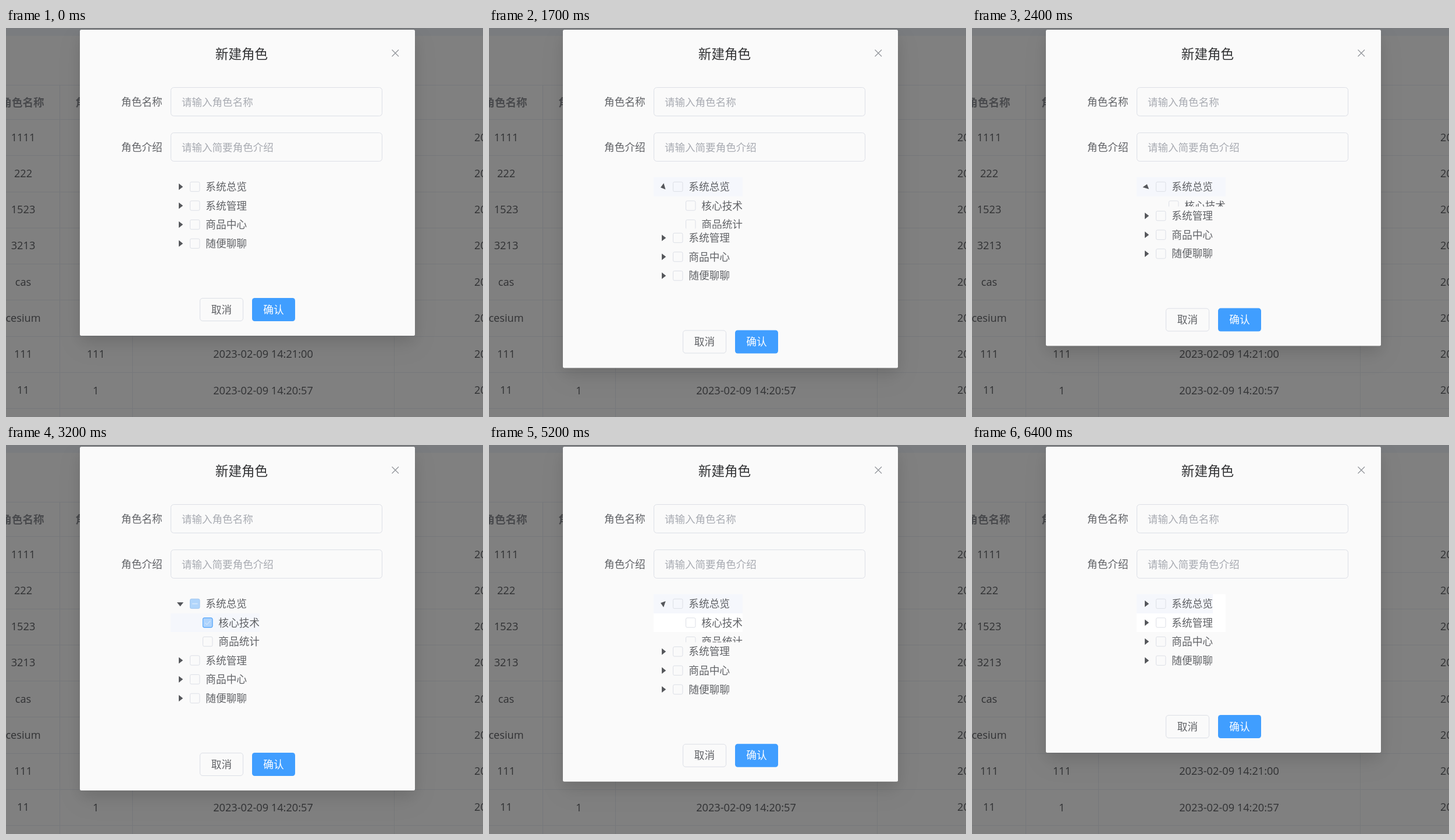
An HTML page that plays this animation: 820 px wide and 670 px high, repeating every 6800 ms.

```html
<!DOCTYPE html>
<html lang="zh">
<head>
<meta charset="utf-8">
<style>
html, body { margin: 0; width: 100%; height: 100%; overflow: hidden; background: #808080; }
svg { display: block; width: 820px; height: 670px; }
text { font-family: "Open Sans", "Noto Sans CJK SC", "Noto Sans CJK", sans-serif; font-size: 17.7px; fill: #606266; }
.cell { font-size: 18.2px; fill: #303133; text-anchor: middle; }
.head { font-size: 18.6px; font-weight: 700; fill: #48494c; text-anchor: middle; }
.left { text-anchor: start; }
.title { font-size: 22.6px; fill: #303133; text-anchor: middle; }
.hint { font-size: 17.55px; fill: #a8abb2; }
.mid { text-anchor: middle; }
.box { fill: none; stroke: #dcdfe6; }
#panel { filter: drop-shadow(0 10px 12px rgba(0,0,0,.09)) drop-shadow(0 15px 20px rgba(0,0,0,.06)); }
</style>
</head>
<body>
<svg id="stage" viewBox="0 0 820 670">
  <defs><clipPath id="fold"><rect id="foldBox" x="283" y="290" width="200" height="0"/></clipPath></defs>
  <rect width="820" height="670" fill="#808080"/>
  <rect width="820" height="13.5" fill="#7a7c7f"/>
  <g id="table"></g>
  <rect id="panel" x="127" y="3" width="576" height="527" rx="2.5" fill="#fafafa"/>
  <g id="form"></g>
  <g id="hover">
    <rect id="rowA" x="283" y="257" width="153" height="33" fill="#f5f7fc"/>
    <rect id="rowTail" x="414" y="257" width="22" height="33" fill="#fff"/>
    <rect id="rowB" x="283" y="290" width="153" height="32"/>
  </g>
  <g id="root"></g>
  <g id="kids" clip-path="url(#fold)"></g>
  <g id="rest"></g>
  <g id="buttons"></g>
</svg>
<script>
const LOOP = 6800, FOLD = 65, PITCH = 32.6, TOP = 273.4, BLUE = '#409eff';
const $ = id => document.getElementById(id);

function add(parent, tag, attrs, content) {
  const el = document.createElementNS('http://www.w3.org/2000/svg', tag);
  for (const k in attrs) el.setAttribute(k, attrs[k]);
  if (content) el.textContent = content;
  parent.appendChild(el);
  return el;
}
// text placed by its vertical centre
function label(parent, str, x, cy, cls = '', drop = 6.6) {
  return add(parent, 'text', { x, y: cy + drop, class: cls }, str);
}
function line(parent, d, stroke, width = 1) {
  return add(parent, 'path', { d, stroke, 'stroke-width': width, fill: 'none' });
}

function buildTable() {
  const g = $('table'), rule = '#76787b';
  line(g, 'M0 98.5H820M0 157.5H820', rule);
  for (let i = 1; i < 9; i++) line(g, `M0 ${Math.round(157 + i * 62.25) + .5}H820`, rule);
  line(g, 'M92.5 98V670M217.5 98V670M667.5 98V670', rule);
  label(g, '角色名称', 28.5, 128, 'head', 7);
  label(g, '角色介绍', 156.5, 128, 'head', 7);
  ['1111', '222', '1523', '3213', 'cas', 'cesium', '111', '11'].forEach((name, i) => {
    const y = 188 + i * 62.25;
    label(g, name, 29.5, y, 'cell');
    label(g, '2023-02-09', 805, y, 'cell left');
  });
  [['111', '2023-02-09 14:21:00', 561.5], ['1', '2023-02-09 14:20:57', 624]].forEach(([info, date, y]) => {
    label(g, info, 154.5, y, 'cell');
    label(g, date, 442, y, 'cell');
  });
}

function buildForm() {
  const g = $('form');
  label(g, '新建角色', 405, 44, 'title', 8.5);
  line(g, 'M663.5 37.5L675 49M675 37.5L663.5 49', '#909399', 1.2);
  [['角色名称', '请输入角色名称', 102.5], ['角色介绍', '请输入简要角色介绍', 180.5]].forEach(([name, hint, y]) => {
    add(g, 'rect', { x: 283.5, y, width: 363, height: 49, rx: 5, class: 'box' });
    label(g, name, 198, y + 25.3);
    label(g, hint, 302, y + 25.3, 'hint');
  });
}

function checkbox(parent, x, cy) {
  const size = { x: x + .5, y: cy - 8.2, width: 16.4, height: 16.4, rx: 2.3 };
  add(parent, 'rect', { ...size, class: 'box' });
  const ring = add(parent, 'rect', { ...size, fill: 'none', stroke: BLUE });
  const fill = add(parent, 'rect', { ...size, fill: BLUE, stroke: BLUE });
  const tick = line(parent, `M${x + 4.3} ${cy + .2}l3 3.2l6 -6.6`, '#fff', 1.3);
  const dash = line(parent, `M${x + 4} ${cy}h9.5`, '#fff', 2);
  return (hover, on, check, part) => {
    [[ring, hover], [fill, on], [tick, check], [dash, part]].forEach(([el, o]) => el.setAttribute('opacity', o));
  };
}

function node(parent, name, cy, depth = 0) {
  const x = 316 + depth * 22;
  const caret = depth ? null : add(parent, 'path', { d: `M297 ${cy - 5.6}L304.2 ${cy}L297 ${cy + 5.6}Z`, fill: '#55575b' });
  const set = checkbox(parent, x, cy);
  label(parent, name, x + 27.3, cy);
  return { caret, set };
}

function buildButtons() {
  const g = $('buttons');
  add(g, 'rect', { x: 333.5, y: 465.5, width: 74, height: 39, rx: 4.5, class: 'box' });
  label(g, '取消', 370.5, 485, 'mid');
  const ok = add(g, 'rect', { x: 423, y: 465, width: 74, height: 40, rx: 4.5 });
  label(g, '确认', 460, 485, 'mid').style.fill = '#fff';
  return ok;
}

buildTable();
buildForm();
const root = node($('root'), '系统总览', TOP);
const kids = ['核心技术', '商品统计'].map((s, i) => node($('kids'), s, TOP + PITCH * (i + 1), 1));
['系统管理', '商品中心', '随便聊聊'].forEach((s, i) => node($('rest'), s, TOP + PITCH * (i + 1)).set(0, 0, 0, 0));
const ok = buildButtons();

const ramp = (t, start, span) => Math.min(1, Math.max(0, (t - start) / span));
const ease = p => p * p * (3 - 2 * p);
const move = (t, start, span) => ease(ramp(t, start, span));
const between = (t, a, b) => t >= a && t < b;
const show = (id, on) => $(id).setAttribute('visibility', on ? 'visible' : 'hidden');

const openness = t => move(t, 1275, 310) - move(t, 1619, 340) + move(t, 2295, 310) - move(t, 5110, 290);

function draw(t) {
  const open = openness(t), dy = FOLD * open;
  $('panel').setAttribute('height', 527 + dy);
  $('foldBox').setAttribute('height', dy);
  $('rest').setAttribute('transform', `translate(0 ${dy})`);
  $('buttons').setAttribute('transform', `translate(0 ${dy})`);
  const turn = -270 * Math.min(open, openness(t + 35));
  root.caret.setAttribute('transform', `rotate(${turn} 299.5 ${TOP})`);

  show('rowA', between(t, 1050, 2850) || t >= 3600);
  show('rowTail', t >= 5700);
  show('rowB', t >= 2850);
  $('rowB').setAttribute('fill', t < 3600 ? '#f5f7fc' : '#fff');

  const off = 1 - ramp(t, 4605, 90);
  const some = ramp(t, 3150, 130) * off;
  const all = ramp(t, 3950, 200) * off;
  const rootHover = t < 2000
    ? ramp(t, 820, 80) - ramp(t, 1050, 150)
    : ramp(t, 3950, 100) - ramp(t, 4840, 160);
  root.set(rootHover, some, all, t < 4000 ? some : 0);
  kids[0].set(ramp(t, 2830, 170) - ramp(t, 3500, 200), some, some, 0);
  kids[1].set(0, all, all, 0);

  ok.setAttribute('fill', between(t, 5800, 6400) ? '#79bbff' : BLUE);
}

function tick() {
  draw(performance.now() % LOOP);
  requestAnimationFrame(tick);
}
tick();
</script>
</body>
</html>
```
